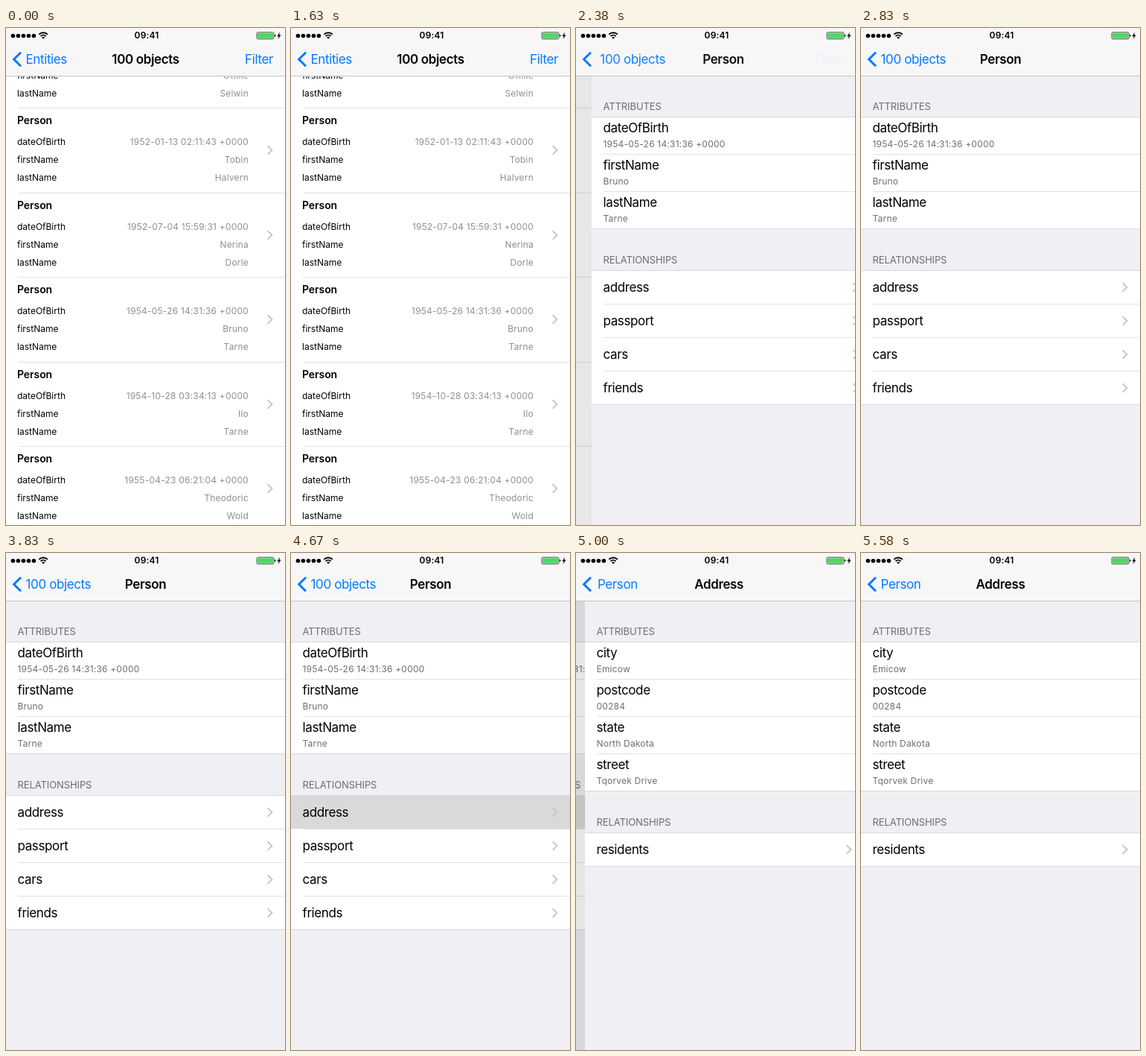
Recreate the animation shown at these times as an HTML page. Size 375x667 px, loop 8040 ms.

```html
<!DOCTYPE html>
<html lang="en">
<head>
<meta charset="utf-8">
<title>Object browser</title>
<style>
html, body { margin: 0; width: 100%; height: 100%; overflow: hidden; background: #fff; }
#stage {
  position: absolute; left: 0; top: 0; width: 375px; height: 667px; overflow: hidden;
  font: 12px/20px Inter, "Open Sans", sans-serif; color: #000;
  --ease: cubic-bezier(.32, .72, 0, 1);
}
#stage div, #stage span, #stage svg, #stage i { position: absolute; }
span { white-space: nowrap; }

/* when each screen comes and goes */
.s1 { --in: -9s; --out: 2143ms; }
.s2 { --in: 2143ms; --out: 4722ms; }
.s3 { --in: 4722ms; --out: 99s; }

.move {
  animation: enter .5s var(--ease) var(--in) backwards,
             leave .5s var(--ease) var(--out) forwards,
             hide var(--hide) var(--ease) var(--out) forwards;
}
@keyframes enter { from { transform: translateX(var(--from)); opacity: var(--fade); } }
@keyframes leave { to { transform: translateX(var(--to)); } }
@keyframes hide { to { opacity: var(--fade); } }

.page { inset: 0; --from: 375px; --to: -112.5px; --fade: 1; --hide: .5s; background: #efeff4; }
.page.s1 { background: #fff; }
.page::after {
  content: ""; position: absolute; inset: 0; background: #000; opacity: 0;
  animation: dim .5s var(--ease) var(--out) forwards;
}
@keyframes dim { to { opacity: .1; } }

.row { left: 0; width: 375px; background: #fff; }
.row::before, .end {
  content: ""; position: absolute; left: 16px; right: 0; top: 0; height: 1px; background: #e2e2e4;
}
.row.first::before { left: 0; background: #d9d8dd; }
.end { left: 0; background: #d9d8dd; }
.press { inset: 0; background: #d9d9d9; opacity: 0; animation: press 1ms 4660ms steps(1, start) forwards; }
@keyframes press { to { opacity: 1; } }

.name { font-size: 14px; font-weight: 600; letter-spacing: -.08px; }
.value { color: #8f8f92; letter-spacing: .2px; }
.sub { color: #6e6e70; letter-spacing: .2px; }
.big { font-size: 17px; letter-spacing: -.38px; }
.head { font-size: 13px; letter-spacing: -.1px; color: #6d6d72; }

#bar { left: 0; top: 0; width: 375px; height: 64px; background: #f7f7f8; border-bottom: 1px solid #c4c4c6; }
#bar .move { top: 32px; font-size: 17px; letter-spacing: -.38px; --fade: 0; --hide: .2s; }
#bar .title { left: 0; width: 375px; text-align: center; font-weight: 600; --from: 187px; --to: -115px; }
#bar .back { left: 26.5px; color: #007aff; --from: 105px; --to: -80px; }
#bar .right { right: 16px; color: #007aff; --to: 0px; --hide: .45s; }
#bar .title.s3 { --from: 145px; }
#bar .back.s3 { --from: 75px; }
#clock { left: 0; width: 378px; top: 0; text-align: center; font-weight: 600; letter-spacing: .15px; }
</style>
</head>
<body>
<div id="stage"></div>
<script>
const LOOP = 8040, FPS = 24;

const text = (y, cls, str, side = 'left', x = 15.5) =>
  `<span class="${cls}" style="${side}:${x}px;top:${y - 10}px">${str}</span>`;

const arrow = y =>
  `<svg style="left:350px;top:${y - 7}px" width="10" height="14" fill="none" stroke="#c7c7cc" stroke-width="2"><path d="M1.7 1.2 7.5 7 1.7 12.8"/></svg>`;

const row = (top, h, cls, inner) =>
  `<div class="row ${cls}" style="top:${top}px;height:${h}px">${inner}</div>`;

const person = ([date, first, last], i) => row(-6.5 + 113.5 * i, 113.5, '',
  text(17, 'name', 'Person', 'left', 15) +
  [['dateOfBirth', date], ['firstName', first], ['lastName', last]].map(([key, val], k) =>
    text(46 + 24 * k, '', key, 'left', 15) + text(46 + 24 * k, 'value', val, 'right', 49)).join('') +
  arrow(57));

const group = (top, title, h, items) =>
  text(top - 14, 'head', title) +
  items.map((inner, i) => row(top + h * i, h, i ? '' : 'first', inner)).join('') +
  `<div class="end" style="top:${top + h * items.length}px"></div>`;

const attributes = pairs => group(119, 'ATTRIBUTES', 50,
  pairs.map(([key, val]) => text(15, 'big', key) + text(37, 'sub', val)));

const relations = (top, names) => group(top, 'RELATIONSHIPS', 45,
  names.map(n => (n === 'address' ? '<i class="press"></i>' : '') + text(23, 'big', n) + arrow(23)));

const page = (n, inner) => `<div class="page move s${n}">${inner}</div>`;
const label = (n, cls, str) => `<span class="move s${n} ${cls}">${str}</span>`;

const people = [
  ['', 'Ottilie', 'Selwin'],
  ['1952-01-13 02:11:43 +0000', 'Tobin', 'Halvern'],
  ['1952-07-04 15:59:31 +0000', 'Nerina', 'Dorle'],
  ['1954-05-26 14:31:36 +0000', 'Bruno', 'Tarne'],
  ['1954-10-28 03:34:13 +0000', 'Ilo', 'Tarne'],
  ['1955-04-23 06:21:04 +0000', 'Theodoric', 'Wold'],
];
const [birth, first, last] = people[3];

const icons = `<svg width="375" height="64" style="left:0;top:0" fill="none">
  ${[0, 1, 2, 3, 4].map(i => `<circle cx="${9.4 + 7 * i}" cy="10.5" r="2.8" fill="#000"/>`).join('')}
  <g stroke="#000" stroke-width="1.8">
    <path d="M44.3 8.7A8.1 8.1 0 0 1 55.9 8.7M46.6 11A5 5 0 0 1 53.6 11"/>
  </g>
  <path d="M48.1 12.7A2.8 2.8 0 0 1 52.1 12.7L50.1 14.8Z" fill="#000"/>
  <rect x="337" y="5.8" width="23" height="9" rx="1.6" stroke="#222" stroke-width=".8"/>
  <rect x="338" y="6.8" width="21" height="7" rx=".7" fill="#4cd964"/>
  <path d="M361 8.6q1.4.4 1.4 1.7t-1.4 1.7zM368.2 5.6 364.4 10.9H366.7L365.6 15 369.6 9.5H367.2Z" fill="#000"/>
  <path d="M20 32.8 10.6 42 20 51.2" stroke="#007aff" stroke-width="3"/>
</svg>`;

document.getElementById('stage').innerHTML =
  page(1, people.map(person).join('')) +
  page(2, attributes([['dateOfBirth', birth], ['firstName', first], ['lastName', last]]) +
    relations(325, ['address', 'passport', 'cars', 'friends'])) +
  page(3, attributes([['city', 'Emicow'], ['postcode', '00284'], ['state', 'North Dakota'], ['street', 'Tqorvek Drive']]) +
    relations(375, ['residents'])) +
  `<div id="bar">${icons}<span id="clock">09:41</span>` +
  label(1, 'back', 'Entities') + label(1, 'title', '100 objects') + label(1, 'right', 'Filter') +
  label(2, 'back', '100 objects') + label(2, 'title', 'Person') +
  label(3, 'back', 'Person') + label(3, 'title', 'Address') + '</div>';

const anims = document.getAnimations();
anims.forEach(a => a.pause());

function tick() {
  const t = performance.now() % LOOP;
  const step = Math.floor(t * FPS / 1000) * 1000 / FPS;
  anims.forEach(a => { a.currentTime = step; });
  requestAnimationFrame(tick);
}
tick();
</script>
</body>
</html>
```
